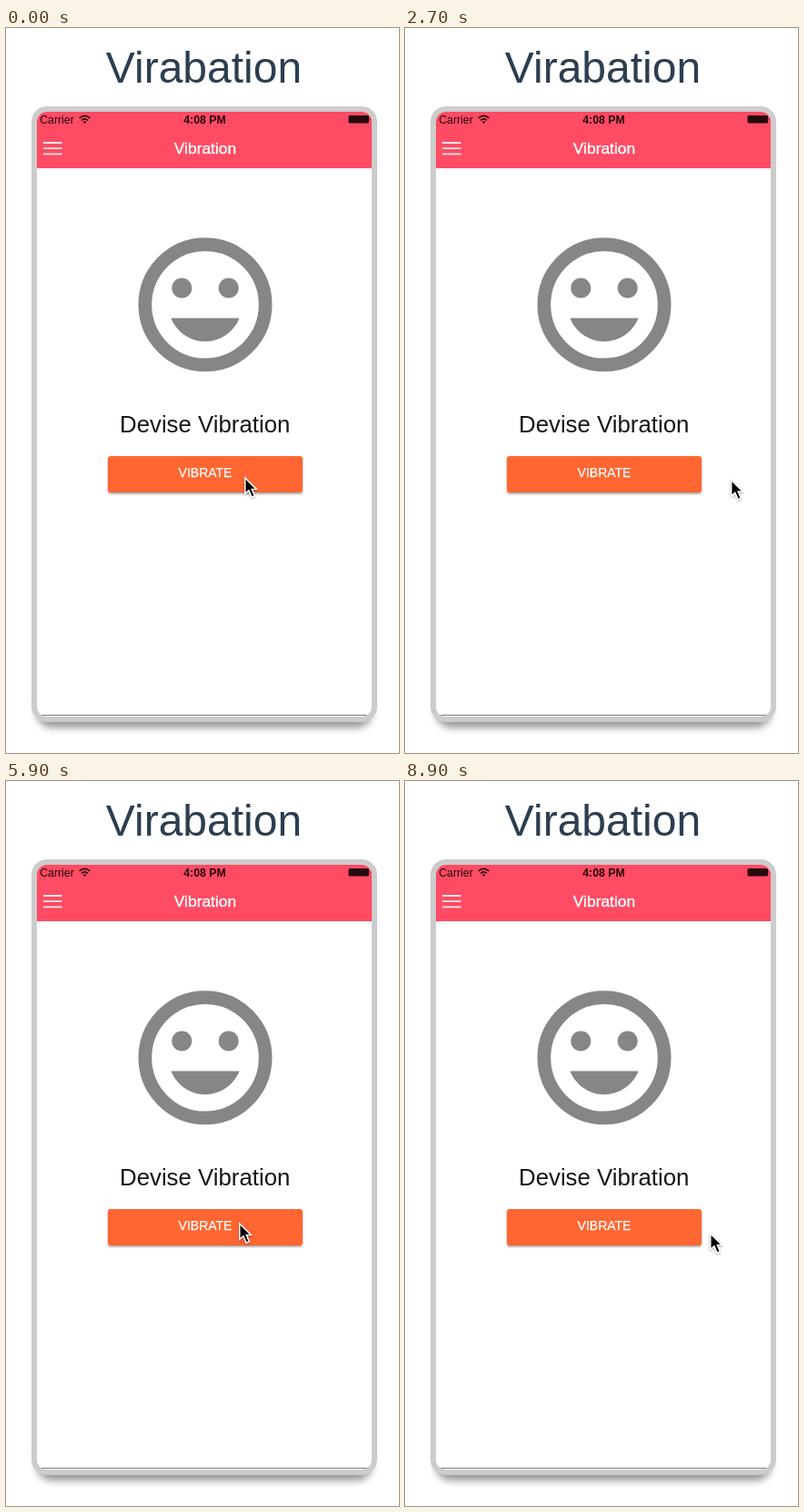
Recreate the animation shown at these times as an HTML page. Size 432 by 796 pixels, loop 9 s.

```html
<!DOCTYPE html>
<html lang="en">
<head>
<meta charset="utf-8">
<title>Vibration</title>
<style>
  html, body { margin: 0; width: 100%; height: 100%; overflow: hidden; background: #fff; }
  svg { display: block; width: 432px; height: 796px; font-family: "Liberation Sans", Arial, sans-serif; }
  text { text-anchor: middle; }
  .medium { fill: #fff; stroke: #fff; }
</style>
</head>
<body>
<svg viewBox="0 0 432 796">
  <defs>
    <clipPath id="screen"><rect x="34" y="92" width="368" height="664" rx="11"/></clipPath>
    <filter id="soft" x="-20%" y="-20%" width="140%" height="140%"><feGaussianBlur stdDeviation="4"/></filter>
    <filter id="buttonShadow" x="-5%" y="-20%" width="110%" height="150%">
      <feDropShadow dx="0" dy="1.5" stdDeviation="1.3" flood-opacity=".38"/>
    </filter>
    <filter id="cursorShadow" x="-50%" y="-50%" width="200%" height="200%">
      <feDropShadow dx="0" dy="1" stdDeviation="1" flood-opacity=".4"/>
    </filter>
  </defs>

  <text x="217.5" y="60" font-size="48" fill="#2c3e50">Virabation</text>

  <rect x="34" y="730" width="368" height="38" rx="16" opacity=".42" filter="url(#soft)"/>
  <rect x="28" y="86" width="380" height="676" rx="17" fill="#ccc"/>

  <g clip-path="url(#screen)">
    <path d="M34 92h368v664H34z" fill="#fff"/>
    <path d="M34 754.5h368" stroke="#777"/>
    <path d="M34 92h368v62H34z" fill="#ff4b63"/>

    <g fill="#26090d">
      <text x="56" y="105" font-size="12.3">Carrier</text>
      <text x="218.5" y="105" font-size="12.3" font-weight="bold">4:08 PM</text>
      <g fill="none" stroke="#26090d" stroke-width="1.7">
        <path d="M80.7 98.8q5.8-4.8 11.6 0M83 101.3q3.5-2.8 7 0"/>
      </g>
      <path d="M84.6 103q1.9-1.5 3.8 0l-1.9 2.1z"/>
      <rect x="376.5" y="96" width="22.5" height="8.5" rx="1.5"/>
      <path d="M400 98.5q1.5 1.7 0 3.5z"/>
    </g>

    <path d="M41 126h20.5M41 132.2h20.5M41 138.4h20.5" stroke="#ffe6ea" stroke-width="1.8"/>
    <text class="medium" x="219" y="138" font-size="17.4" stroke-width=".4">Vibration</text>

    <g id="face" transform="translate(219 303.8) scale(7.35)">
      <circle r="9" fill="none" stroke="currentColor" stroke-width="2"/>
      <g fill="currentColor">
        <circle cx="-3.5" cy="-2.5" r="1.5"/>
        <circle cx="3.5" cy="-2.5" r="1.5"/>
        <path d="M0 5.5c2.33 0 4.31-1.46 5.11-3.5H-5.11c.8 2.04 2.78 3.5 5.11 3.5z"/>
      </g>
    </g>

    <text x="218.7" y="443.5" font-size="25.8" fill="#161616">Devise Vibration</text>

    <rect x="112" y="470" width="214" height="40" rx="3" fill="#ff6632" filter="url(#buttonShadow)"/>
    <text class="medium" x="219" y="493.3" font-size="14" stroke-width=".25">VIBRATE</text>

    <g id="cursor" filter="url(#cursorShadow)">
      <path d="M.8 1V18.3L4.9 14.6 8.1 22 11.4 20.6 8.2 13.4H13.4Z" stroke="#fff" stroke-width="1.4"/>
    </g>
  </g>
</svg>
<script>
  const LOOP = 9000, STEP = 100;
  const face = document.getElementById('face');
  const cursor = document.getElementById('cursor');

  // Intervals in which the device vibrates, in ms
  const buzzes = [[400, 1400], [4500, 5500], [6500, 7500]];

  // Cursor stops: time, x, y; x = 410 lies beyond the screen
  const stops = [
    [0, 262, 493], [2400, 262, 493], [2900, 410, 497],
    [4100, 410, 480], [4500, 256, 485],
    [8500, 256, 485], [8900, 335, 496], [9000, 360, 497]
  ];

  const ease = p => p * p * (3 - 2 * p);

  function cursorAt(t) {
    const i = stops.findIndex(s => s[0] > t);
    const [t0, x0, y0] = stops[i - 1], [t1, x1, y1] = stops[i];
    const p = ease((t - t0) / (t1 - t0));
    return [x0 + (x1 - x0) * p, y0 + (y1 - y0) * p];
  }

  function draw(time) {
    const t = Math.floor((time % LOOP) / STEP) * STEP;
    const buzzing = buzzes.some(([from, to]) => t >= from && t < to);
    face.style.color = buzzing ? '#ff6632' : '#868686';
    cursor.setAttribute('transform', `translate(${cursorAt(t)})`);
  }

  const start = performance.now();
  function tick() {
    draw(performance.now() - start);
    requestAnimationFrame(tick);
  }
  tick();
</script>
</body>
</html>
```
